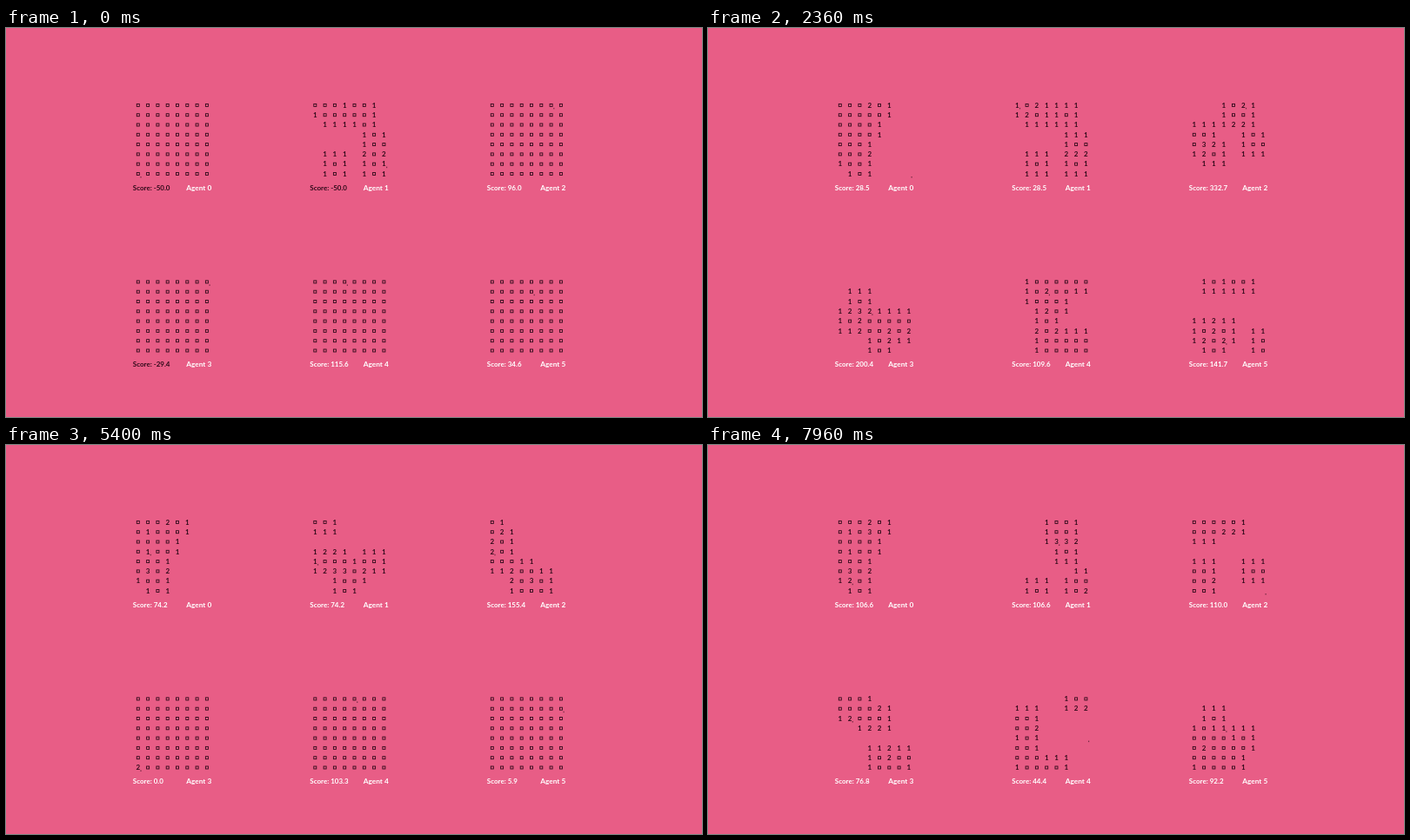
An HTML page with a canvas that plays this animation: 800 px wide and 448 px high, repeating every 8000 ms.

```html
<!DOCTYPE html>
<html lang="en">
<head>
<meta charset="utf-8">
<title>Minesweeper agents</title>
<style>
html, body { margin: 0; width: 100%; height: 100%; overflow: hidden; background: #e85d86; }
canvas { display: block; }
</style>
</head>
<body>
<canvas id="stage" width="800" height="448"></canvas>
<script>
const ctx = document.getElementById('stage').getContext('2d');
const LOOP = 8000, STEP = 200, PITCH = 11.3, PANEL = 203.5;
const PINK = '#e85d86', DARK = '#300a1a';
const FULL = '*/*/*/*/*/*/*/*';
const TIMES = [0, 720, 2360, 4160, 5400, 7000, 7960];

// Per agent and key time: board rows, cursor "column row", score.
// "o" is a closed field, "*" a closed row, a space an empty field.
const AGENTS = [
  [
    [FULL, '07', -50],
    ['*/*/*/*/*/*/1ooooooo/ 1oooooo', '07', 0.1],
    ['ooo2o1/ooooo1/oooo1/oooo1/ooo1/ooo2/1oo1/ 1o1', '77', 28.5],
    ['ooo2o1/o1ooo1/oooo1/oooo1/ooo1/ooo2/1oo1/ 1o1', '11', 43.4],
    ['ooo2o1/o1ooo1/oooo1/o1oo1/ooo1/o3o2/1oo1/ 1o1', '13', 74.2],
    ['ooo2o1/o1o3o1/oooo1/o1oo1/ooo1/o3o2/1oo1/ 1o1', '31', 90.2],
    ['ooo2o1/o1o3o1/oooo1/o1oo1/ooo1/o3o2/12o1/ 1o1', '16', 106.6]
  ], [
    ['ooo1oo1/1ooooo1/ 1111o1/     1o1/     1oo/ 111 2o2/ 1o1 1o1/ 1o1 1o1', '76', -50],
    ['oo21oo1/12oooo1/ 1111o1/     111/     1oo/ 111 2o2/ 1o1 1o1/ 111 1o1', '27', 0.1],
    ['1o21111/12o11o1/ 111111/     111/     1oo/ 111 222/ 1o1 1o1/ 111 111', '00', 28.5],
    ['oo1/111//1221 111/oooo1ooo/12ooooo1/  1ooooo/  1ooooo', '75', 43.4],
    ['oo1/111//1221 111/1ooo1oo1/1233o211/  1oo1/  1o1', '04', 74.2],
    [FULL, '62', 90.2],
    ['   1oo1/   1oo1/   1332/    1o1/    111/      11/ 111 1oo/ 1o1 1o2', '42', 106.6]
  ], [
    [FULL, '60', 96],
    ['*/*/ooo12ooo/oo1  1oo/ooo1 1oo/1oo1 111/ 111/', '07', 168.6],
    ['   1o21/   1oo1/1111221/oo1  1o1/o321 1oo/12o1 111/ 111/', '50', 332.7],
    ['*/*/*/*/*/11oooooo/  2ooooo/  1ooooo', '07', 44.2],
    ['o1/o21/2o1/2o1/ooo11/112oo11/  2o3o1/  1ooo1', '03', 155.4],
    [' 1o21/ 13o2/  3o3/113o2/ooo11/111/    111/    1o1', '02', 60.7],
    ['ooooo1/ooo221/111//111  111/oo1  1oo/oo2  111/oo1', '77', 110]
  ], [
    [FULL, '70', -29.4],
    ['/ 111/ 1o1/1o3o1111/*/112ooooo/   1o2oo/   1oooo', '56', 59.8],
    ['/ 111/ 1o1/12321111/1o2ooooo/112oo2o2/   1o211/   1o1', '33', 200.4],
    ['///111111/1oooo1/oooooo1/ooooooo1/1ooooooo', '30', 30.8],
    ['*/*/*/*/*/*/*/2ooooooo', '07', 0],
    ['o1/o1   111/1o11 1oo/ 1oo1ooo/ 1111o2o/    1ooo/     1o1/     1o1', '44', 86.8],
    ['ooo1/oooo21/12ooo1/  1221//   11211/   1o2oo/   1ooo1', '12', 76.8]
  ], [
    [FULL, '30', 115.6],
    [FULL, '30', -2],
    [' 1oooooo/ 1o2oo11/ 1ooo1/  12o1/  1o1/  2o2111/  1ooooo/  1ooooo', '31', 109.6],
    ['o1 2oooo/11 2oooo/   11ooo/     111///  111/  1o1', '07', 49.8],
    [FULL, '40', 103.3],
    ['o1/11/    1221/  11oooo/  1o233o/ 1221oo1/ 1o1 111/ 1o1', '35', 158.2],
    ['     1oo/111  122/oo1/oo2/1o1/oo1/ooo111/1oooo1', '74', 44.4]
  ], [
    [FULL, '41', 34.6],
    ['ooo1oooo/*/*/*/*/*/1ooooooo/ 1oooooo', '30', 1.3],
    [' 1o1oo1/ 111111///11211/1o2o1 11/12o21 1o/ 1o1  1o', '36', 141.7],
    ['      1o/      1o/ 111  11/ 1oo32oo/ 12ooooo/  123221//', '72', 90],
    [FULL, '71', 5.9],
    ['*/*/*/*/*/*/*/1ooooooo', '07', 0],
    ['/ 111/ 1o1/1o11111/oooo1o1/o2oooo1/ooooo1/1oooo1', '33', 92.2]
  ]
].map(keys => keys.map(([rows, at, score]) => ({
  board: rows.split('/').map(r => r === '*' ? 'oooooooo' : r.padEnd(8)).join('').padEnd(64),
  cursor: +at[1] * 8 + +at[0],
  score
})));

const closed = { board: 'o'.repeat(64), cursor: 0, score: 0 };

function touchesEmpty(cell, empty) {
  return empty.some(e => Math.abs(e % 8 - cell % 8) + Math.abs((e >> 3) - (cell >> 3)) <= 1);
}

// Clicks that lead from one board to the next: a flood first, then single fields.
function clicksBetween(from, to) {
  const opened = [...to.board].map((_, i) => i)
    .filter(i => from.board[i] === 'o' && to.board[i] !== 'o');
  const empty = opened.filter(i => to.board[i] === ' ');
  const order = i => i === to.cursor ? 99 : i * 37 % 64;
  const singles = opened.filter(i => !touchesEmpty(i, empty)).sort((a, b) => order(a) - order(b));
  const flood = opened.filter(i => touchesEmpty(i, empty))
    .sort((a, b) => to.board[a] > to.board[b] ? 1 : -1);
  return [...(flood.length ? [flood] : []), ...singles.map(i => [i])];
}

function stateBetween(from, to, step, steps) {
  if (step <= 0) return from;
  if (step >= steps) return to;
  const sameGame = [...from.board].every((c, i) => c === 'o' || c === to.board[i]);
  if (!sameGame) {
    const reset = steps >> 1;
    return step < reset ? from : stateBetween(closed, to, step - reset, steps - reset);
  }
  const clicks = clicksBetween(from, to);
  const done = clicks.slice(0, Math.ceil(clicks.length * step / steps));
  const board = [...from.board];
  done.flat().forEach(i => board[i] = to.board[i]);
  const part = clicks.length ? done.length / clicks.length : step / steps;
  const base = to.score < from.score ? 0 : from.score;
  return {
    board,
    cursor: done.length ? done[done.length - 1][0] : to.cursor,
    score: base + (to.score - base) * part
  };
}

function stateAt(keys, t) {
  const k = TIMES.findLastIndex(start => start <= t);
  if (k === TIMES.length - 1) return keys[k];
  const span = TIMES[k + 1] - TIMES[k], steps = Math.round(span / STEP);
  return stateBetween(keys[k], keys[k + 1], Math.floor((t - TIMES[k]) / span * steps), steps);
}

function write(text, x, y, size, color, align = 'left') {
  ctx.font = `700 ${size}px Lato, sans-serif`;
  ctx.textAlign = align;
  ctx.fillStyle = color;
  ctx.fillText(text, x, y);
}

function drawAgent(index, { board, cursor }, score) {
  const left = 151.8 + index % 3 * PANEL, top = 88.9 + Math.floor(index / 3) * PANEL;
  const place = i => [left + i % 8 * PITCH, top + (i >> 3) * PITCH];
  ctx.strokeStyle = DARK;
  ctx.lineWidth = 0.9;
  for (let i = 0; i < 64; i++) {
    const [x, y] = place(i);
    if (board[i] === 'o') ctx.strokeRect(x - 1.5, y - 1.5, 3, 3);
    else if (board[i] !== ' ') write(board[i], x, y + 2.7, 8, DARK, 'center');
  }
  const [x, y] = place(cursor);
  ctx.fillStyle = 'rgba(48, 10, 26, 0.6)';
  ctx.fillRect(x + 2.6, y + 3, 1.2, 1.5);
  write('Score: ' + score.toFixed(1), left - 6, top + 97.8, 8, score < 0 ? DARK : '#fff');
  write('Agent ' + index, left + 55.4, top + 97.8, 8.3, '#fff');
}

function draw(now) {
  const t = now % LOOP;
  ctx.fillStyle = PINK;
  ctx.fillRect(0, 0, 800, 448);
  const states = AGENTS.map(keys => stateAt(keys, t));
  // The first two agents share one score.
  states.forEach((state, i) => drawAgent(i, state, states[i === 1 ? 0 : i].score));
  requestAnimationFrame(draw);
}
requestAnimationFrame(draw);
</script>
</body>
</html>
```
